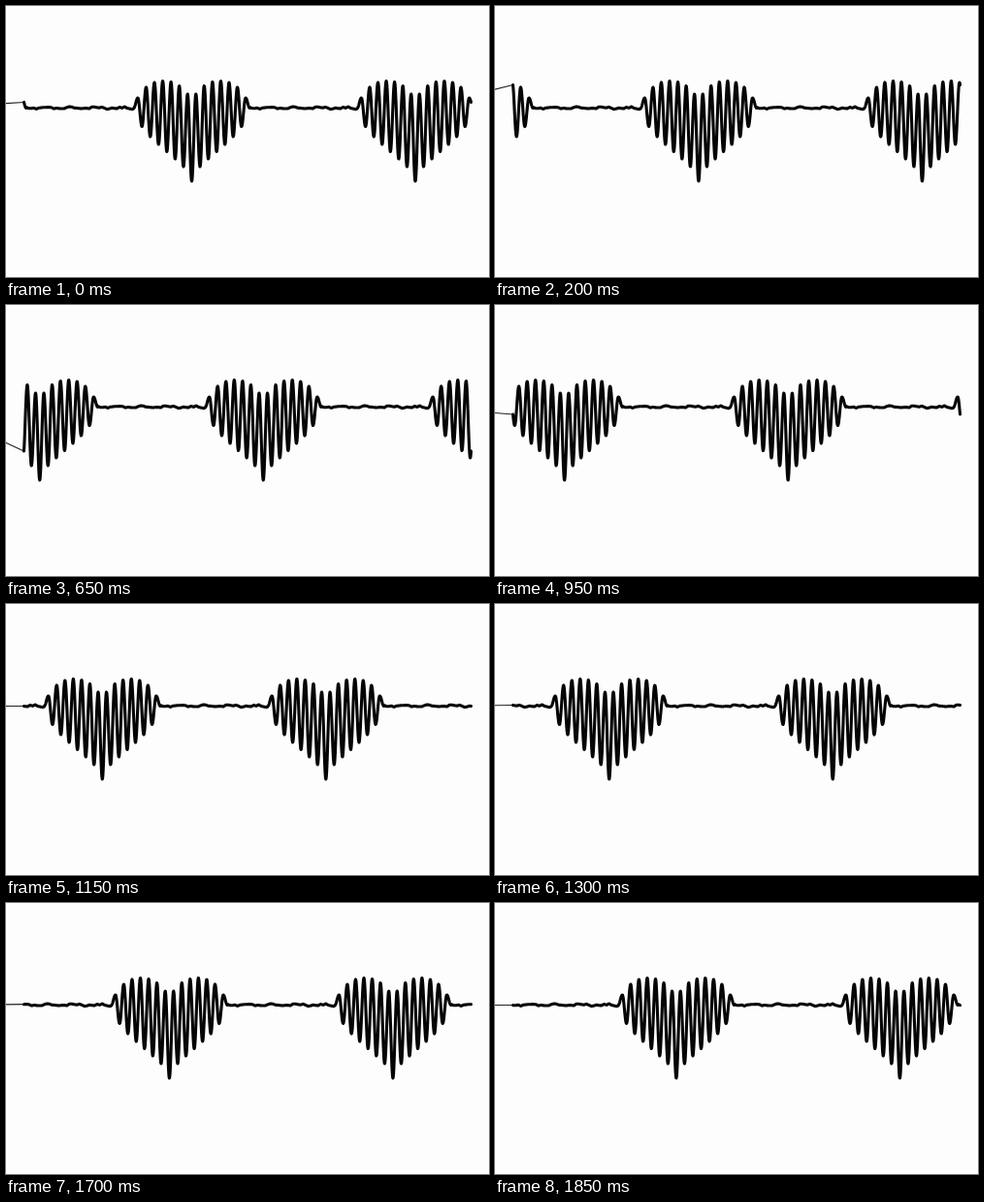
An HTML page with a canvas for the animation above (1.9 s loop, 498x280 px).

```html
<!DOCTYPE html>
<html lang="en">
<head>
<meta charset="utf-8">
<title>Heart pulse</title>
<style>
  html, body { margin: 0; width: 100%; height: 100%; overflow: hidden; background: #fdfdfd; }
  canvas { display: block; }
</style>
</head>
<body>
<canvas id="stage" width="498" height="280"></canvas>
<script>
const ctx = document.getElementById('stage').getContext('2d');

const LOOP = 1900, STEP = 50, UNITS = 50;
const PERIOD = 230.5, LEFT = 18.5, RIGHT = LEFT + 2 * PERIOD;
const BASE = 105.5, HALF_WAVE = 4.275;

// Heights of one half of the heart, from the tip outwards: trough, peak, trough, ...
const HEART = [181, 91, 166, 82.5, 158, 78.5, 150.5, 77.5, 143, 79, 135, 84, 124.5, 95, BASE];
const HEART_END = (HEART.length - 1) * HALF_WAVE;

// Rough resting line between hearts
let seed = 11;
const random = () => (seed = (seed * 16807) % 2147483647) / 2147483647;
const REST_STEP = 2.6;
const rest = Array.from({ length: 46 }, (_, i) =>
  BASE - 0.1 + (random() - 0.5) * 1.7 + 0.7 * Math.sin(i * 0.62));

const mod = (a, n) => ((a % n) + n) % n;

function heightAt(offset) {
  const q = mod(offset, PERIOD);
  const d = Math.min(q, PERIOD - q);
  if (d < HEART_END) {
    const i = Math.floor(d / HALF_WAVE);
    const mix = (1 - Math.cos(Math.PI * (d / HALF_WAVE - i))) / 2;
    return HEART[i] + (HEART[i + 1] - HEART[i]) * mix;
  }
  const p = (q - HEART_END) / REST_STEP;
  const i = Math.floor(p);
  return rest[i] + (rest[i + 1] - rest[i]) * (p - i);
}

// The trace starts slowly, then skips ahead at times
function unitsAt(time) {
  const k = Math.floor(mod(time, LOOP) / STEP);
  return Math.max(k, Math.round(9 + 1.385 * (k - 8)));
}

function draw(time) {
  const tip = 191.5 + unitsAt(time) * PERIOD / UNITS;
  const startY = heightAt(LEFT - tip);

  ctx.fillStyle = '#fdfdfd';
  ctx.fillRect(0, 0, 498, 280);
  ctx.lineCap = ctx.lineJoin = 'round';

  ctx.strokeStyle = '#222';
  ctx.lineWidth = 1.1;
  ctx.beginPath();
  ctx.moveTo(-1, BASE + (startY - BASE) * 0.8);
  ctx.lineTo(LEFT, startY);
  ctx.stroke();

  ctx.strokeStyle = '#050505';
  ctx.lineWidth = 3.1;
  ctx.beginPath();
  for (let x = LEFT; x <= RIGHT; x += 0.25) ctx.lineTo(x, heightAt(x - tip));
  ctx.stroke();
}

const start = performance.now();
function tick() {
  draw(performance.now() - start);
  requestAnimationFrame(tick);
}
tick();
</script>
</body>
</html>
```
